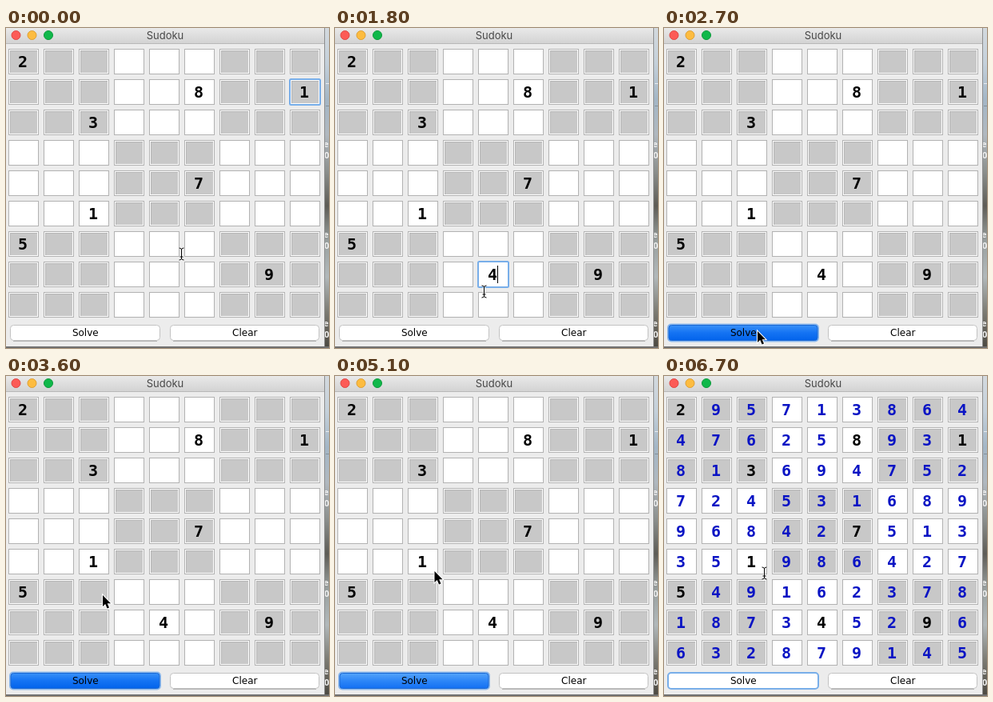
Animation of 404x400 px, one loop 8000 ms. Source, as an HTML page with a canvas:

```html
<!DOCTYPE html>
<html>
<head>
<meta charset="utf-8">
<title>Sudoku</title>
<style>
html, body { margin: 0; width: 100%; height: 100%; overflow: hidden; background: #ececec; }
canvas { display: block; }
</style>
</head>
<body>
<canvas id="stage" width="404" height="400"></canvas>
<script>
const ctx = document.getElementById('stage').getContext('2d');
const LOOP = 8000;
const solution = ['295713864', '476258931', '813694752', '724531689', '968427513',
                  '351986427', '549162378', '187345296', '632879145'];
const givens = ['00', '15', '18', '22', '45', '52', '60', '77'];

// Pointer path: time, x, y
const path = [[0, 219, 282], [300, 203, 317], [1600, 203, 317], [2300, 117, 379],
              [3400, 117, 379], [3500, 119, 328], [3600, 121, 274], [3700, 123, 252],
              [3800, 124.5, 244], [LOOP, 124.5, 244]];

function rect(x, y, w, h, color) {
  ctx.fillStyle = color;
  ctx.fillRect(x, y, w, h);
}

function text(s, x, y, font, color) {
  ctx.font = font;
  ctx.fillStyle = color;
  ctx.fillText(s, x, y);
}

function gradient(y0, y1, colors) {
  const g = ctx.createLinearGradient(0, y0, 0, y1);
  colors.forEach((c, i) => g.addColorStop(i / (colors.length - 1), c));
  return g;
}

function rounded(x, y, w, h, r, fill, stroke, line = 1) {
  ctx.beginPath();
  ctx.roundRect(x, y, w, h, r);
  if (fill) { ctx.fillStyle = fill; ctx.fill(); }
  if (stroke) { ctx.strokeStyle = stroke; ctx.lineWidth = line; ctx.stroke(); }
}

function drawDesktop() {
  rect(398, 0, 6, 400, gradient(0, 400, ['#d3d9de', '#c4d0da', '#a3b6c6', '#b0b8bf',
    '#8d918f', '#5e5c56', '#99a09f', '#b1b8ba', '#7b7a72', '#4b4841']));
  rect(400, 69, 4, 1, '#e8ecef');
  rect(400, 97, 4, 1, '#83909b');
  for (const y of [149, 262, 373]) {
    text('e', 397, y, 'bold 11px "Open Sans", sans-serif', '#f2f2f2');
    text('0.', 398, y + 14, 'bold 11px "Open Sans", sans-serif', '#f2f2f2');
  }
  rect(398, 0, 1, 400, '#8d8d8d');
  rect(0, 398, 404, 2, '#707070');
}

function drawWindow() {
  rect(0, 0, 398, 398, '#ececec');
  rect(0, 0, 398, 19, gradient(0, 19, ['#e9e9e9', '#d3d3d3']));
  rect(0, 19, 398, 1, '#b8b8b8');
  [['#fc5b57', '#df4744', 12.5], ['#fdbc40', '#de9f34', 32.5], ['#10b84a', '#0c9a3b', 53]].forEach(
    ([fill, edge, x]) => rounded(x - 5.5, 3.5, 11, 11, 5.5, fill, edge));
  ctx.textAlign = 'center';
  text('Sudoku', 199, 14, '13px Inter, sans-serif', '#484848');
}

function drawCell(r, c, t) {
  const x = 3 + 44 * c, y = 26 + 38 * r;
  const id = '' + r + c;
  const gray = (Math.floor(r / 3) + Math.floor(c / 3)) % 2 === 0;
  rect(x, y, 38, 32, '#b2b2b2');
  rect(x + 1, y + 1, 36, 30, '#fff');
  if (gray) {
    rect(x + 2, y + 2, 34, 28, '#b5b5b5');
    rect(x + 3, y + 3, 33, 27, '#c8c8c8');
  }
  const given = givens.includes(id) || (id === '74' && t >= 1300);
  if (given || t >= 6700) {
    text(solution[r][c], x + 18, y + 23, 'bold 20px "DejaVu Sans Mono", monospace',
      given ? '#000' : '#0a14c4');
  }
}

function drawFocus(r, c) {
  rounded(3 + 44 * c, 26 + 38 * r, 38, 32, 1.5, null, '#78aee9', 2);
}

function drawButton(label, x, w, state) {
  if (state === 'plain') {
    rounded(x + .5, 371.5, w - 1, 19, 4, '#fff', '#c2c2c2');
    rect(x + 4, 391, w - 8, 1, '#b2b2b2');
  } else if (state === 'focus') {
    rounded(x, 371, w, 20, 4, '#fff', '#78aee9', 2);
  } else {
    const colors = state === 'dark' ? ['#3f95f8', '#1473f3', '#0061ea'] : ['#5aa8fa', '#2d86f7', '#0f6df2'];
    rounded(x, 370.5, w, 21, 4, gradient(370, 392, colors), '#8bb8ec', 2);
    rounded(x + 1, 371.5, w - 2, 19, 3.5, null, '#1c68d2');
  }
  text(label, x + w / 2 + .3, 385, '12px "DejaVu Sans", sans-serif', '#000');
}

function pointerAt(t) {
  const i = path.findIndex(p => p[0] > t) - 1;
  const [t0, x0, y0] = path[i], [t1, x1, y1] = path[i + 1];
  let k = (t - t0) / (t1 - t0);
  if (t1 === 2300) k = k * k * (3 - 2 * k);
  return [x0 + (x1 - x0) * k, y0 + (y1 - y0) * k];
}

function drawBeam(x, y) {
  const shape = new Path2D('M-3 -7.5Q0 -7.5 0 -5.5V5.5Q0 7.5 -3 7.5M3 -7.5Q0 -7.5 0 -5.5V5.5Q0 7.5 3 7.5M-2 3.5H2');
  ctx.save();
  ctx.translate(Math.round(x) + .5, Math.round(y) + .5);
  ctx.strokeStyle = 'rgba(255,255,255,.65)';
  ctx.lineWidth = 2.4;
  ctx.stroke(shape);
  ctx.strokeStyle = '#000';
  ctx.lineWidth = 1;
  ctx.stroke(shape);
  ctx.restore();
}

function drawArrow(x, y) {
  const shape = new Path2D('M0 0V14L3.2 11L5.6 16.4L8 15.4L5.7 10.2H10Z');
  ctx.save();
  ctx.translate(x, y);
  ctx.strokeStyle = '#fff';
  ctx.lineWidth = 2;
  ctx.stroke(shape);
  ctx.fillStyle = '#000';
  ctx.fill(shape);
  ctx.restore();
}

function draw(t) {
  ctx.textAlign = 'left';
  drawDesktop();
  drawWindow();
  for (let r = 0; r < 9; r++) for (let c = 0; c < 9; c++) drawCell(r, c, t);

  if (t < 500) drawFocus(1, 8);
  else if (t < 2600) drawFocus(7, 4);
  if (t >= 1100 && t < 2600) rect(t < 1300 ? 197 : 203, 297, 1, 22, '#000');

  const solve = t < 2600 ? 'plain' : t < 4100 ? 'dark' : t < 6700 ? 'light' : 'focus';
  drawButton('Solve', 5, 188, solve);
  drawButton('Clear', 205, 187, 'plain');

  // The pointer hides while typing
  if (t >= 1100 && t < 1700) return;
  const [x, y] = pointerAt(t);
  if (t >= 6600) drawBeam(125, 246);
  else if (t >= 2600 || y > 362) drawArrow(x, y);
  else drawBeam(x, y);
}

const start = performance.now();
function frame() {
  const t = (performance.now() - start) % LOOP;
  draw(Math.floor(t / 100) * 100);
  requestAnimationFrame(frame);
}
frame();
</script>
</body>
</html>
```
